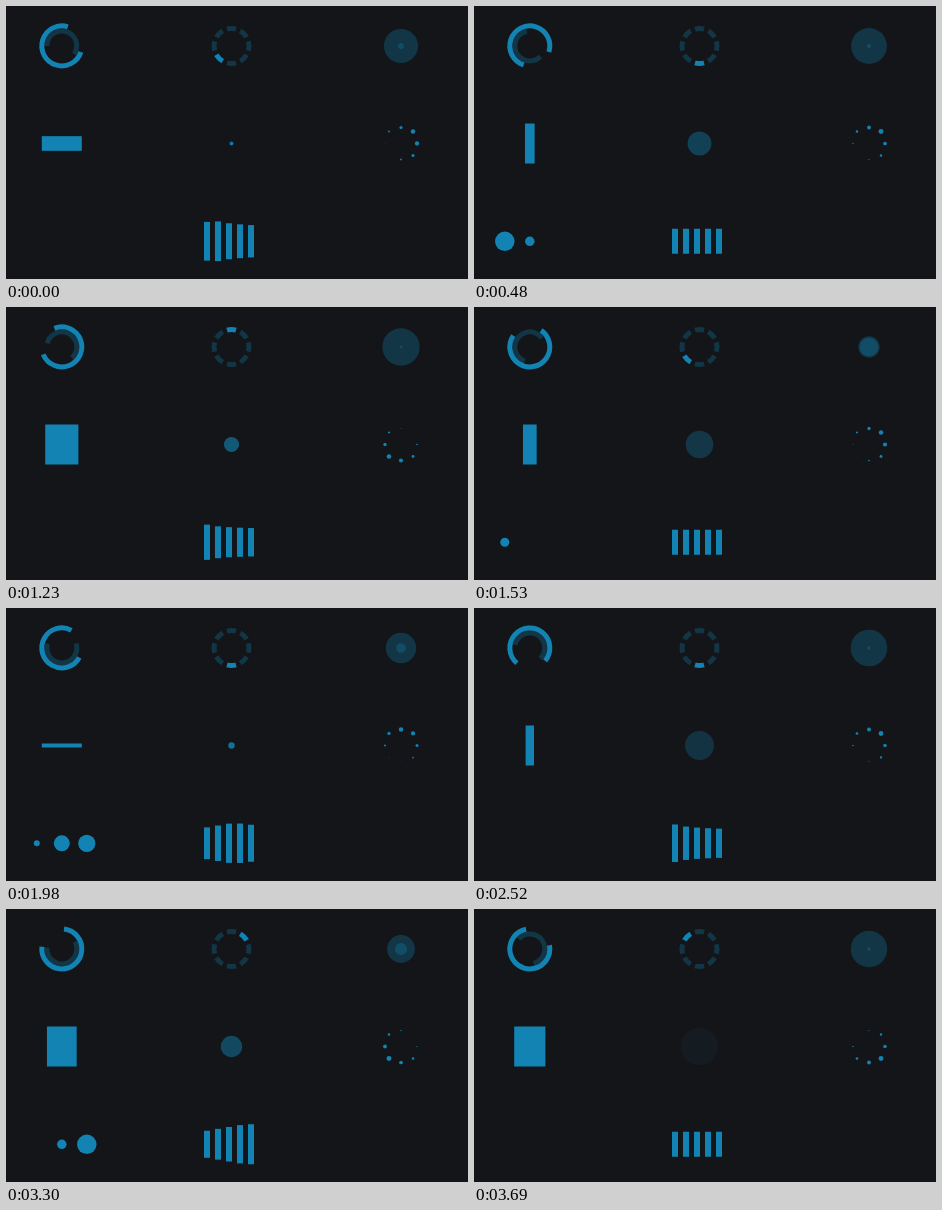
An HTML page with a canvas for the animation above (3720 ms loop, 462x273 px).

```html
<!DOCTYPE html>
<html lang="en">
<head>
<meta charset="utf-8">
<title>Loading indicators</title>
<style>
  html, body { margin: 0; width: 100%; height: 100%; overflow: hidden; background: #141518; }
  canvas { display: block; }
</style>
</head>
<body>
<canvas id="stage" width="462" height="273"></canvas>
<script>
const ctx = document.getElementById('stage').getContext('2d');
const LOOP = 3720, STEP = 30;      // ms
const START = 18.1465, RATE = 640; // indicator clock: seconds at loop start, ms per second
const BLUE = '#1283b3', DIM = 0.3;

const phase = (t, period) => (t % period) / period;
const clamp = v => Math.max(0, Math.min(1, v));

// 0 to 1 over `rise`, stay for `hold`, back to 0 over `fall`
const bump = (age, rise, hold, fall) =>
  Math.min(clamp(age / rise), clamp(1 - (age - rise - hold) / fall));

function disc(x, y, diameter, alpha = 1) {
  ctx.globalAlpha = alpha;
  ctx.beginPath();
  ctx.arc(x, y, diameter / 2, 0, Math.PI * 2);
  ctx.fill();
}

// Angles in degrees, clockwise from the top
function arc(x, y, radius, start, sweep, alpha = 1) {
  const from = (start - 90) * Math.PI / 180;
  ctx.globalAlpha = alpha;
  ctx.beginPath();
  ctx.arc(x, y, radius, from, from + sweep * Math.PI / 180);
  ctx.stroke();
}

function bar(x, y, width, height) {
  ctx.globalAlpha = 1;
  ctx.fillRect(x - width / 2, y - height / 2, width, height);
}

function arcs(x, y, t) {
  arc(x, y, 20, 90 + 360 * phase(t, 3), 270);
  arc(x, y, 15, 296 - 360 * phase(t, 2), 214, DIM);
}

function arcsRing(x, y, t) {
  const lit = Math.floor(8 * phase(t, 0.8));
  for (let i = 0; i < 8; i++) arc(x, y, 17.5, i * 45 - 15, 30, i === lit ? 1 : DIM);
}

function doubleBounce(x, y, t) {
  const size = 1 - Math.abs(1 - 2 * phase(t, 2));
  disc(x, y, 40 * size, DIM);
  disc(x, y, 40 * (1 - size), DIM);
}

function flipPlane(x, y, t) {
  const p = phase(t, 1.6);
  const side = 40 * Math.abs(1 - 4 * (p % 0.5));
  if (p < 0.5) bar(x, y, 40, side);
  else bar(x, y, side, 40);
}

function pulse(x, y, t) {
  const p = phase(t, 1.5);
  disc(x, y, 40 * p, 1 - p);
}

function ring(x, y, t) {
  for (let i = 0; i < 8; i++) {
    const size = 1 - Math.abs(1 - 2 * phase(t - i * 0.1, 0.8));
    const angle = i * Math.PI / 4, radius = i % 2 ? 17 : 16;
    disc(x + radius * Math.sin(angle), y - radius * Math.cos(angle), 5 * size);
  }
}

function threeDots(x, y, t) {
  const age = (t - 1.31) % 1.9;
  for (let i = 0; i < 3; i++) disc(x + (i - 1) * 25, y, 20 * bump(age - i * 0.25, 0.5, 0.08, 0.5));
}

function wave(x, y, t) {
  const age = t % 1;
  for (let i = 0; i < 5; i++) {
    bar(x + (i - 2) * 11, y, 6, 25 + 15 * bump(age, 0.1 + i * 0.05, 0.03, 0.2));
  }
}

function draw(now) {
  const t = START + Math.floor((now % LOOP) / STEP) * STEP / RATE;
  ctx.globalAlpha = 1;
  ctx.fillStyle = '#141518';
  ctx.fillRect(0, 0, 462, 273);
  ctx.fillStyle = ctx.strokeStyle = BLUE;
  ctx.lineWidth = 5;
  arcs(55.8, 39.9, t);
  arcsRing(225.5, 40, t);
  doubleBounce(395, 40, t);
  flipPlane(55.8, 137.5, t);
  pulse(225.5, 137.5, t);
  ring(395, 137.5, t);
  threeDots(55.8, 235.3, t);
  wave(223, 235.25, t);
}

const begin = performance.now();
function tick() {
  draw(performance.now() - begin);
  requestAnimationFrame(tick);
}
tick();
</script>
</body>
</html>
```
